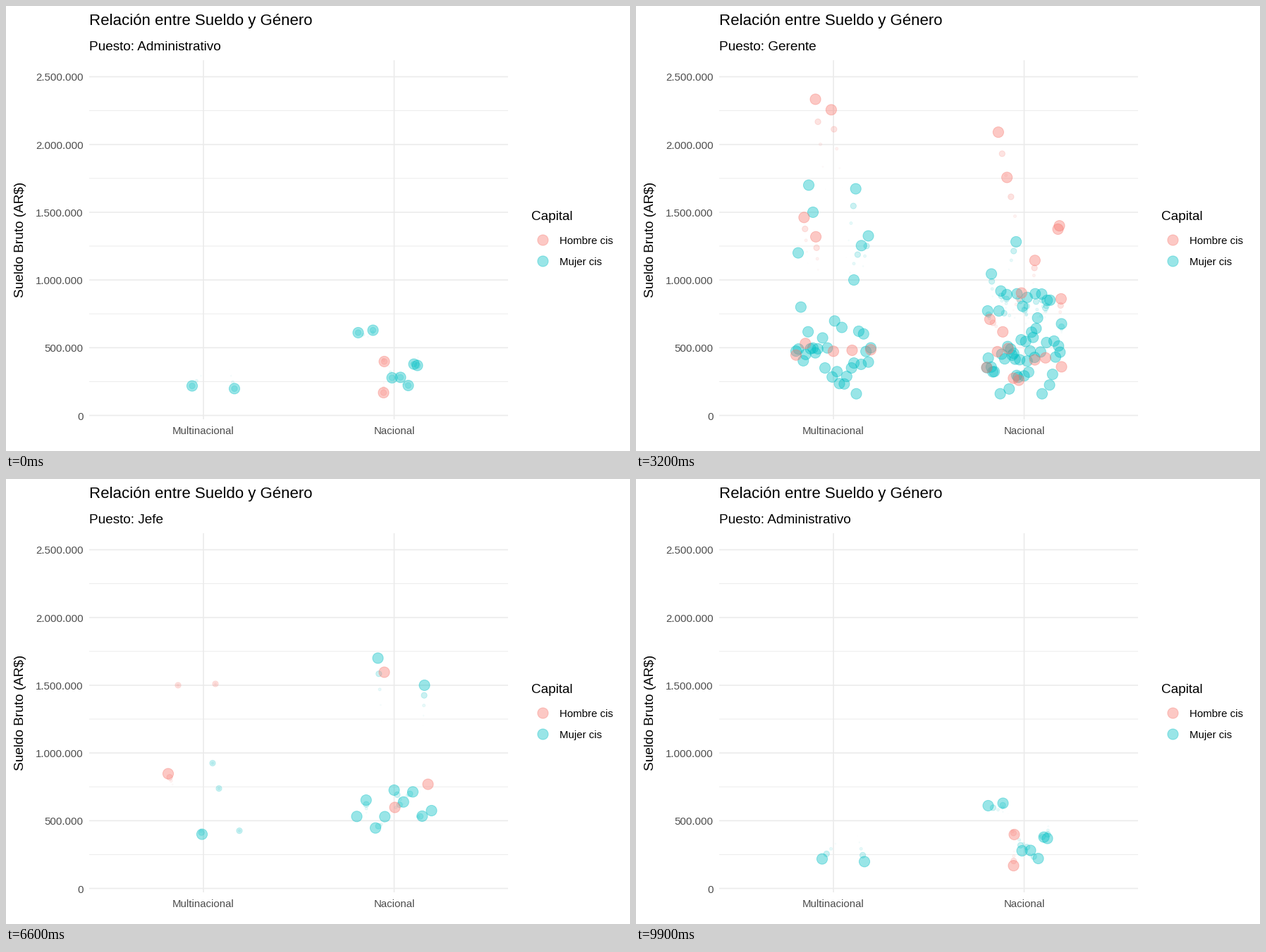
Write a matplotlib script that moves like this. It is 885 by 632 pixels and loops after 10000 ms.

```python
import numpy as np
import matplotlib.pyplot as plt
from matplotlib.animation import FuncAnimation
from matplotlib.colors import to_rgb

W, H, DPI = 885, 632, 64
PT = 72 / DPI                        # points per pixel
FRAMES, STEP = 100, 100
COLOURS = {"mujer": to_rgb("#00BFC4"), "hombre": to_rgb("#F8766D")}
CENTRES = {"multi": 280, "nac": 550.5}
BASE, PER_K = 581.5, 0.1924          # y of salary 0, pixels per 1000 AR$
JITTER = 53
ALPHA, STROKE = 0.4, 0.95
WAKE = [(i / 5) ** 3 for i in range(1, 5)]   # oldest first

ROLES = ["Administrativo", "Analista", "Gerente", "HRBP", "Jefe", "Responsable"]
STARTS = [5, 22, 39, 55, 71, 89]     # first moving frame after each role
ARRIVALS = [16, 33, 49, 66, 82, 99]
TRAILS = [False, False, False, True, True, False]  # leaving dots keep a wake

GROUPS = [(c, g) for g in COLOURS for c in CENTRES]
dots = {(r, *g): np.empty((0, 2)) for r in ROLES for g in GROUPS}
rng = np.random.default_rng(7)


def group(role, capital, gender, head=(), n=0, mean=0, sd=0, tail=()):
    """n random salaries between fixed (jitter, thousands) pairs."""
    jitter = rng.permutation(np.linspace(-JITTER, JITTER, n))
    salary = mean + sd * np.clip(rng.normal(size=n), -2, 2)
    data = np.array([*head, *zip(jitter, salary), *tail], float)
    dots[role, capital, gender] = np.column_stack(
        [CENTRES[capital] + data[:, 0], BASE - PER_K * data[:, 1]])


group("Administrativo", "multi", "mujer", [(-16, 218), (44, 198)])
group("Administrativo", "nac", "mujer",
      [(-51, 611), (-30, 629), (-3, 278), (9, 281), (20, 221), (28, 379), (33, 369)])
group("Administrativo", "nac", "hombre", [(-14, 398), (-15, 168)])

group("Analista", "multi", "mujer", n=32, mean=480, sd=160,
      tail=[(-35, 1700), (-29, 1500), (-50, 1200), (29, 1000)])
group("Analista", "nac", "mujer", n=51, mean=440, sd=140)
group("Analista", "multi", "hombre", n=9, mean=530, sd=150)
group("Analista", "nac", "hombre", n=15, mean=430, sd=140,
      tail=[(50, 1400), (48, 1375)])

group("Gerente", "multi", "mujer", [(35, 1800), (45, 1320), (52, 1400)])
group("Gerente", "nac", "mujer", [(-8, 1350), (-47, 1100)], 12, 850, 110)
group("Gerente", "multi", "hombre",
      [(-29, 2500), (-7, 2400), (-43, 1546), (-26, 1400)])
group("Gerente", "nac", "hombre",
      [(-42, 2250), (-30, 1900), (16, 1200)], 3, 860, 100)

group("HRBP", "multi", "mujer", [(-11, 546), (13, 925), (22, 738), (51, 426)])
group("HRBP", "nac", "mujer", n=8, mean=510, sd=115)
group("HRBP", "multi", "hombre", [(-25, 530), (-36, 1500), (17, 1510)])

group("Jefe", "multi", "mujer", [(-2, 400)])
group("Jefe", "nac", "mujer", [(-23, 1700), (43, 1500)], 9, 660, 130)
group("Jefe", "multi", "hombre", [(-50, 847)])
group("Jefe", "nac", "hombre", [(-14, 1596), (48, 769), (1, 598)])

group("Responsable", "multi", "mujer", n=4, mean=690, sd=80,
      tail=[(1, 2000), (53, 1400), (36, 1000)])
group("Responsable", "nac", "mujer", n=28, mean=540, sd=140, tail=[(45, 1100)])
group("Responsable", "multi", "hombre", n=3, mean=690, sd=200, tail=[(18, 1487)])
group("Responsable", "nac", "hombre", n=9, mean=620, sd=170)


def phase(f):
    """Role index and progress towards the next role (0 while holding)."""
    for k, (a, b) in enumerate(zip(STARTS, ARRIVALS)):
        if f < b:
            return k, max(0, f - a + 1) / (b - a + 1)
    return 0, 0.0


def layout(k, t, leaving=True):
    """Positions and colours of all dots at one moment."""
    pos, col = [], []
    for g in GROUPS:
        now = dots[(ROLES[k], *g)]
        nxt = dots[(ROLES[(k + 1) % len(ROLES)], *g)]
        n = min(len(now), len(nxt))
        pts = now[:n] + (nxt[:n] - now[:n]) * t
        if leaving:
            pts = np.vstack([pts, now[n:]])
        pos.append(pts)
        col += [COLOURS[g[1]]] * len(pts)
    return np.vstack(pos), np.array(col).reshape(-1, 3)


def layer(pos, col, scale):
    rgba = np.column_stack([col, np.full(len(pos), ALPHA * scale)])
    radius = 7.11 * scale + 0.47
    return pos, rgba, np.full(len(pos), (2 * radius * PT) ** 2)


plt.rcParams["font.family"] = "Liberation Sans"
fig = plt.figure(figsize=(W / DPI, H / DPI), dpi=DPI, facecolor="white")
ax = fig.add_axes([0, 0, 1, 1])
ax.set_xlim(0, W)
ax.set_ylim(H, 0)
ax.axis("off")


def label(x, y, s, px, color="black", **kw):
    return ax.text(x, y, s, fontsize=px * PT, color=color, va="baseline", **kw)


def line(xs, ys, px):
    ax.plot(xs, ys, color="#EBEBEB", lw=px * PT, solid_capstyle="butt",
            snap=False, zorder=1)


def scatter(pos, rgba, size):
    return ax.scatter(pos[:, 0], pos[:, 1], s=size, facecolors=rgba,
                      edgecolors=rgba, linewidths=STROKE * PT, zorder=3)


BIG, MID, SMALL, GREY = 22.3, 19, 15, "#4D4D4D"
for k in range(0, 2501, 250):
    y = BASE - PER_K * k
    major = k % 500 == 0
    line([118, 712], [y, y], 1.6 if major else 0.9)
    if major:
        label(109.5, y + 6, f"{k * 1000:,}".replace(",", "."), SMALL, GREY,
              ha="right")
for x, name in zip(CENTRES.values(), ["Multinacional", "Nacional"]):
    line([x, x], [77, 587], 1.6)
    label(x, 608, name, SMALL, GREY, ha="center")

label(118, 27, "Relación entre Sueldo y Género", BIG)
subtitle = label(118, 63, "", MID)
label(25.5, 332, "Sueldo Bruto (AR$)", MID, rotation=90, ha="center",
      rotation_mode="anchor")
label(745.5, 304.5, "Capital", MID)
for y, gender, name in [(331.5, "hombre", "Hombre cis"), (362, "mujer", "Mujer cis")]:
    scatter(*layer(np.array([[761, y]]), np.array([COLOURS[gender]]), 1))
    label(785, y + 6, name, SMALL)

cloud = scatter(*layer(*layout(0, 0), 1))


def draw(f):
    k, t = phase(f)
    layers = []
    for back, scale in zip(range(len(WAKE), 0, -1), WAKE):
        wk, wt = phase((f - back) % FRAMES)
        leaving = TRAILS[wk] or t == wt == 0
        layers.append(layer(*layout(wk, wt, leaving), scale))
    layers.append(layer(*layout(k, t), 1))
    pos, rgba, size = (np.concatenate(part) for part in zip(*layers))
    cloud.set_offsets(pos)
    cloud.set_sizes(size)
    cloud.set_facecolor(rgba)
    cloud.set_edgecolor(rgba)
    subtitle.set_text("Puesto: " + ROLES[(k + (t > 0)) % len(ROLES)])
    return cloud, subtitle


anim = FuncAnimation(fig, draw, frames=FRAMES, interval=STEP, repeat=True,
                     repeat_delay=0, blit=False)
plt.show()
```
